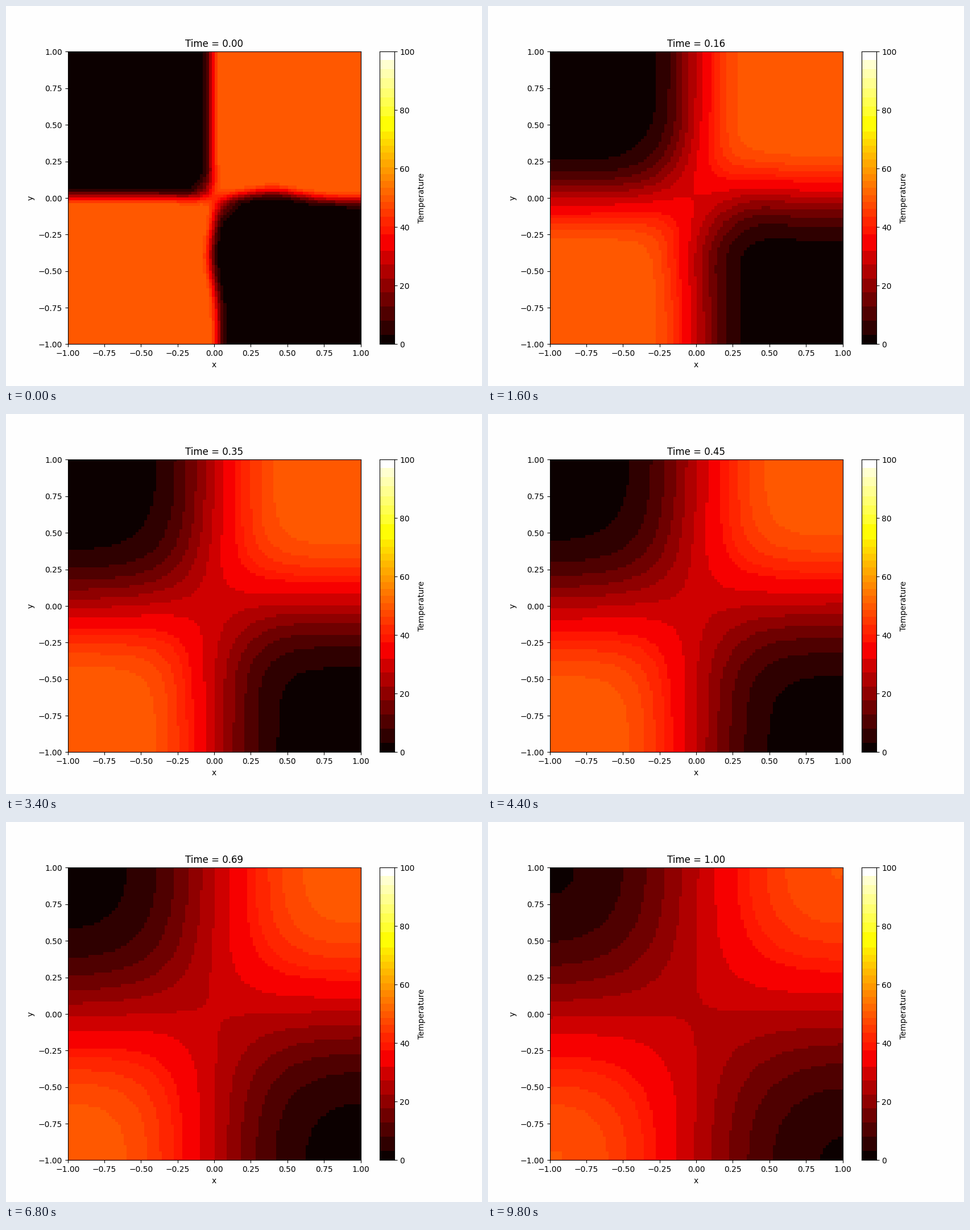
Animation of 837x669 px, one loop 10 s. Source, as a matplotlib script:

```python
import math

import matplotlib.pyplot as plt
import numpy as np
from matplotlib.animation import FuncAnimation
from matplotlib.colors import BoundaryNorm, ListedColormap

W, H, DPI = 837, 669, 100
FRAMES, STEP = 50, 200
N = 100

erf = np.vectorize(math.erf, otypes=[float])
X, Y = np.meshgrid(np.linspace(-1, 1, N), np.linspace(-1, 1, N))


def heat_colors():
    """Hot colours reduced to flat bands: red, then green, then blue rises."""
    red = np.arange(32, 256, 32)
    green = np.array([6, 24, 46] + list(range(64, 241, 16)))
    blue = np.arange(32, 256, 32)
    edges = np.concatenate([
        [0],
        (red / 255 - 0.0416) / 2.6252,
        0.3651 + green / 255 * 0.381,
        0.746 + blue / 255 * 0.254,
        [1],
    ]) * 100
    bands = [(12, 0, 0)]
    bands += [(r + 15, 0, 0) for r in red[:-1]] + [(247, 0, 0)]
    bands += [(255, g, 0) for g in (22, 37, 56)]
    bands += [(255, g + 8, 0) for g in green[3:-1]] + [(255, 253, 5)]
    bands += [(255, 255, b + 16) for b in blue[:-1]] + [(255, 255, 255)]
    cmap = ListedColormap(np.array(bands) / 255)
    return cmap, BoundaryNorm(edges, len(bands))


def side(s, w):
    """Diffused step at 0 between insulated walls at -1 and 1."""
    return erf(s / w) - erf((s + 2) / w) - erf((s - 2) / w)


def sigmoid(s):
    return 1 / (1 + np.exp(-s))


def bump(s, mid):
    return np.exp(-((s - mid) / 0.25) ** 2)


def temperature(t):
    w = math.sqrt(0.048 ** 2 + 0.4 * t)
    ripple = 0.055 * math.exp(-t / 0.25)
    pull = 0.055 * (1 - math.exp(-t / 0.06))

    # the two fronts are slightly bent
    dx = -0.028 * np.tanh(Y / 0.15) - ripple * bump(Y, -0.4)
    dy = -0.005 - 0.015 * np.tanh(X / 0.3) + ripple * bump(X, 0.4)
    dx += pull * (X < 0) * (1 - np.exp(-(X / w) ** 2)) * sigmoid(Y / 0.1)
    dy -= pull * (Y > 0) * (1 - np.exp(-(Y / w) ** 2)) * sigmoid(-X / 0.1)
    p = side(X - dx, w) * side(Y - dy, w)

    # warm bridge across the middle
    off = 0.06 * (1 - math.exp(-t / 0.03))
    r2 = (X + off) ** 2 + (Y - off) ** 2
    p += 0.68 / (1 + 8.5 * t) * np.exp(-r2 / (0.012 + 0.6 * t)) * (1 - p)

    hot = np.clip(p, 0, 1)
    p += 0.75 * hot ** 6 * (1 - hot)
    return np.clip(25 + 25 * p, 0, 99.9)


def add_axes(left, top, width, height):
    return fig.add_axes([left / W, 1 - (top + height) / H, width / W, height / H])


plt.rcParams["font.family"] = "DejaVu Sans"
# the small margin keeps the pixel size from rounding down
fig = plt.figure(figsize=((W + 0.01) / DPI, (H + 0.01) / DPI), dpi=DPI,
                 facecolor="#fefefe")
cmap, norm = heat_colors()

ax = add_axes(108.5, 80.5, 515, 515)
image = ax.imshow(temperature(0), cmap=cmap, norm=norm, origin="lower",
                  extent=(-1, 1, -1, 1), interpolation="nearest", aspect="auto")
ticks = np.linspace(-1, 1, 9)
ax.set_xticks(ticks)
ax.set_yticks(ticks)
ax.set_xlabel("x")
ax.set_ylabel("y")
title = ax.set_title("Time = 0.00")

bar = add_axes(656.5, 80.5, 26, 515)
ramp = (np.arange(512) + 0.5)[:, None] / 512 * 100
bar.imshow(ramp, cmap=cmap, norm=norm, origin="lower", extent=(0, 1, 0, 100),
           interpolation="nearest", aspect="auto")
bar.set_xticks([])
bar.set_yticks(range(0, 101, 20))
bar.yaxis.tick_right()
bar.yaxis.set_label_position("right")
bar.set_ylabel("Temperature")


def update(i):
    t = i / (FRAMES - 1)
    image.set_data(temperature(t))
    title.set_text(f"Time = {t:.2f}")
    return image, title


anim = FuncAnimation(fig, update, frames=FRAMES, interval=STEP,
                     repeat=True, repeat_delay=0, blit=False)
plt.show()
```
